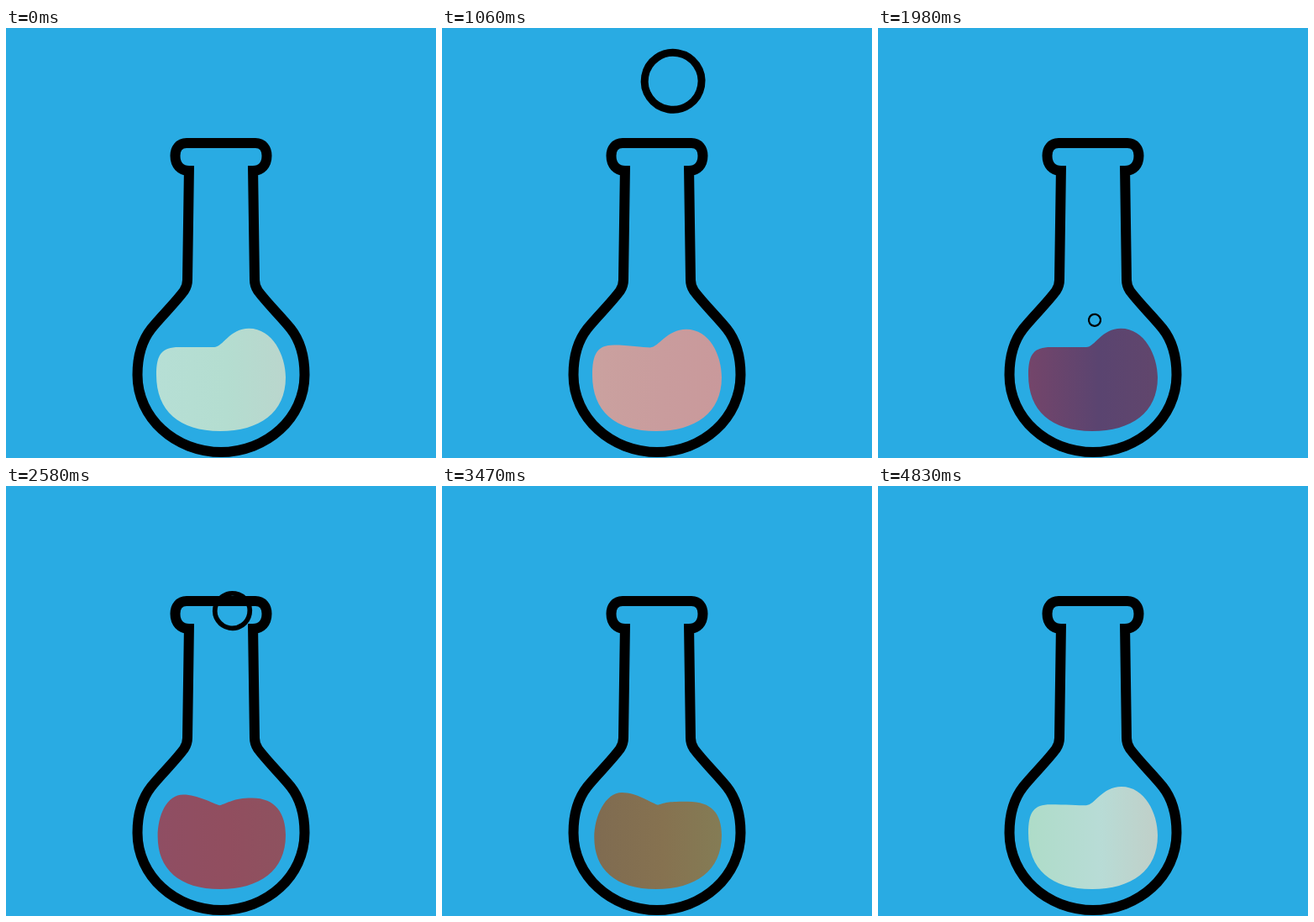
Write an HTML page with a canvas that moves like this. It is 512 px wide and 512 px high and loops after 4960 ms.

```html
<!DOCTYPE html>
<html lang="en">
<head>
<meta charset="utf-8">
<title>Bubbling flask</title>
<style>
  html, body { margin: 0; height: 100%; overflow: hidden; background: #29abe3; }
  canvas { display: block; }
</style>
</head>
<body>
<canvas width="512" height="512"></canvas>
<script>
const ctx = document.querySelector('canvas').getContext('2d');
const LOOP = 4960, WAVE = LOOP / 5, BUBBLE = 1705;

// Left half of the flask; the right half is its mirror image.
const halfFlask = new Path2D(
  'M257 137H215C206 137 201.5 144 201.5 152C201.5 163 208 170 218 170H222' +
  'M218 164L216 300Q216 307 212 313C200 329 185 343 173 358' +
  'C162 372 156.5 390 156.5 413C156.5 464 201 505 257 505');

// Liquid surface: left edge, left crest, notch, right crest, notch sharpness.
const tiltRight = [179, 413, 206, 380.5, 248, 380, 289, 357.5, 0];
const middle = [179, 414, 203, 374, 248, 381, 293, 360.5, 0];
const tiltLeft = [181, 418, 213, 366, 256, 380, 293, 374, 3];

// Time, then left, centre and right colour of the liquid.
const tints = [
  [0, 'b6dfd5', 'b4ddd0', 'bad6cd'],
  [800, 'b6dfd5', 'b4ddd0', 'bad6cd'],
  [1450, 'e8454f', 'e83c50', 'e03f50'],
  [1540, 'e8454f', 'e83c50', 'e03f50'],
  [1980, '74456a', '5a4470', '61466c'],
  [2200, '5f4570', '564472', '5a466e'],
  [2880, 'b45558', 'c05650', 'b65c54'],
  [4100, '46824a', '489050', '4e9e56'],
  [4830, 'aedcc8', 'b8dcd6', 'c0cfc8'],
  [LOOP, 'b6dfd5', 'b4ddd0', 'bad6cd']
].map(([time, ...colors]) => [time, ...colors.flatMap(channels)]);

// Time, x, y, radius of one rising bubble.
const rise = [
  [130, 256, 400, 5],
  [275, 258, 348, 7],
  [630, 248, 266, 9],
  [690, 249, 236, 9.5],
  [760, 266, 202, 12.5],
  [1090, 276, 50, 36],
  [1260, 276, 50, 36]
];

function channels(hex) {
  return [0, 2, 4].map(i => parseInt(hex.slice(i, i + 2), 16));
}

function mix(a, b, k) {
  return a.map((v, i) => v + (b[i] - v) * k);
}

function at(keys, t) {
  const i = Math.max(1, keys.findIndex(key => key[0] >= t));
  const a = keys[i - 1], b = keys[i];
  return mix(a, b, (t - a[0]) / (b[0] - a[0])).slice(1);
}

function drawBubble(t) {
  const u = t % BUBBLE;
  if (u < 130 || u >= 1260) return;
  const [x, y, r] = at(rise, u);
  ctx.save();
  ctx.lineWidth = 0.5 + r / 4;
  if (u > 1090) {
    const step = 2 * Math.PI * r / 7;
    ctx.setLineDash([step * 0.48, step * 0.52]);
  }
  ctx.beginPath();
  ctx.arc(x, y, r, -2.18, -2.18 + 2 * Math.PI);
  ctx.stroke();
  ctx.restore();
}

function drawLiquid(t) {
  const p = (1 - Math.cos(2 * Math.PI * (t / WAVE + 0.05))) / 2;
  const [lx, ly, ax, ay, nx, ny, bx, by, kink] = p < 0.3
    ? mix(tiltRight, middle, p / 0.3)
    : mix(middle, tiltLeft, (p - 0.3) / 0.6);

  const rgb = at(tints, t);
  const fill = ctx.createLinearGradient(179, 0, 333, 0);
  [0, 0.55, 1].forEach((stop, i) =>
    fill.addColorStop(stop, `rgb(${rgb.slice(3 * i, 3 * i + 3).map(Math.round)})`));
  ctx.fillStyle = fill;

  ctx.beginPath();
  ctx.moveTo(lx, ly);
  ctx.bezierCurveTo(lx, ly - 25, ax - 20, ay, ax, ay);
  ctx.bezierCurveTo(ax + 17, ay, nx - 9, ny - kink, nx, ny);
  ctx.bezierCurveTo(nx + 10, ny - kink, bx - 23, by, bx, by);
  ctx.bezierCurveTo(bx + 28, by, 333, 390, 333, 416);
  ctx.bezierCurveTo(333, 458, 302, 480, 255, 480);
  ctx.bezierCurveTo(206, 480, lx, 456, lx, ly);
  ctx.fill();
}

function drawFlask() {
  ctx.lineWidth = 12;
  ctx.stroke(halfFlask);
  ctx.save();
  ctx.translate(512, 0);
  ctx.scale(-1, 1);
  ctx.stroke(halfFlask);
  ctx.restore();
}

function frame() {
  const t = performance.now() % LOOP;
  ctx.fillStyle = '#29abe3';
  ctx.fillRect(0, 0, 512, 512);
  drawBubble(t);
  drawLiquid(t);
  drawFlask();
  requestAnimationFrame(frame);
}
frame();
</script>
</body>
</html>
```
